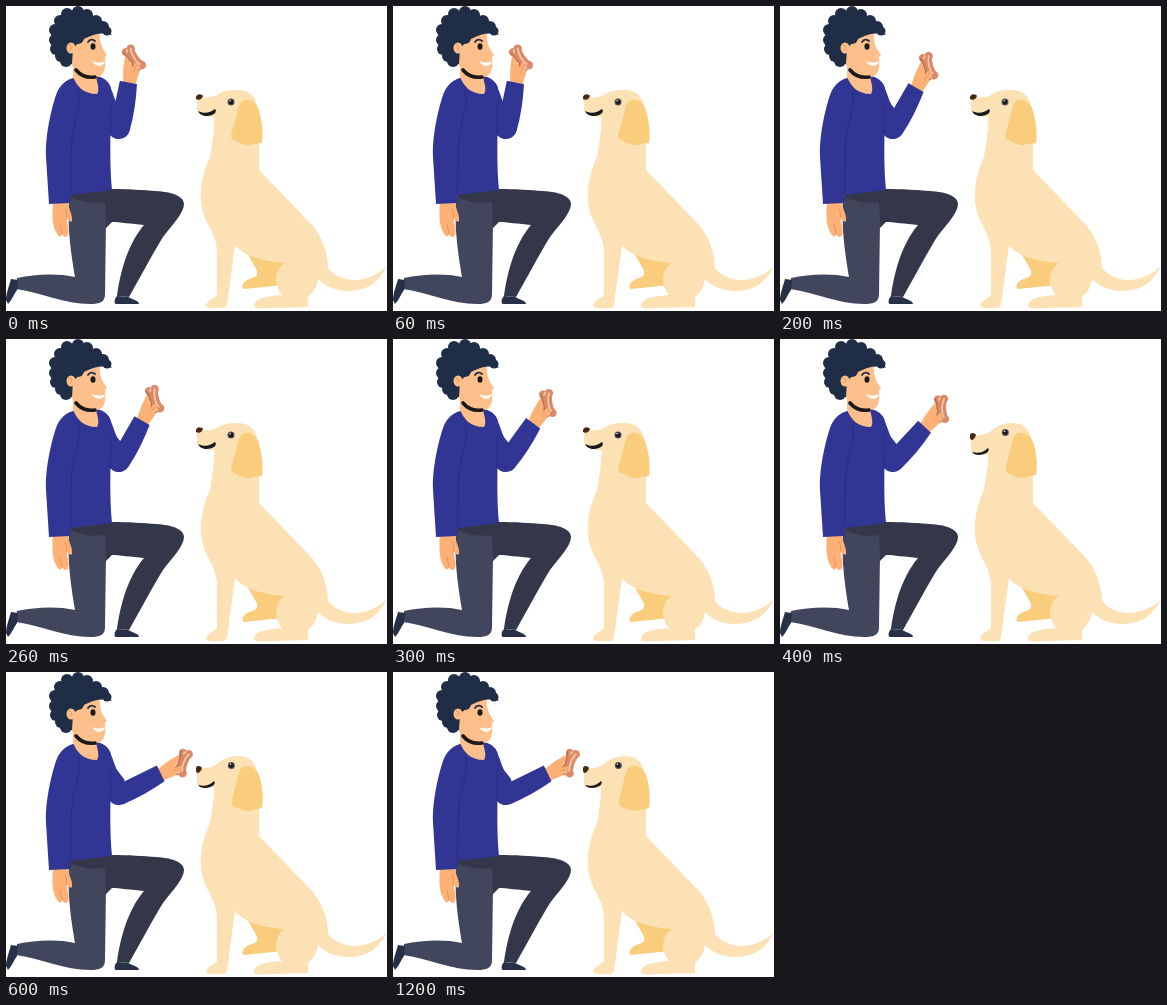
Recreate the animation shown at these times as an HTML page with a canvas. Size 381 by 305 pixels, loop 1.6 s.

```html
<!DOCTYPE html>
<html lang="en">
<head>
<meta charset="utf-8">
<title>Treat for the dog</title>
<style>
html, body { margin: 0; width: 100%; height: 100%; overflow: hidden; background: #fff; }
canvas { display: block; }
</style>
</head>
<body>
<canvas id="stage" width="381" height="305"></canvas>
<script>
const ctx = document.getElementById('stage').getContext('2d');
const LOOP = 1600, STEP = 100;
const ARM_ANGLES = [-78, -68, -60, -54, -47, -38, -26];
const ELBOW = [113, 122];
const HEAD_DROP_STEP = 4;

const C = {
  hair: '#1f2d46', skin: '#fdbf8b', hand: '#fdb176', skinShade: '#e9935f', black: '#1c191b',
  sweater: '#313695', seam: '#292c80',
  farLeg: '#333749', nearLeg: '#42465c', shoe: '#273047',
  fur: '#fbe1b3', ear: '#f9cd7c', nose: '#49260f', eyeRim: '#55565c',
  bone: '#d98a68', boneLight: '#f5c5a8', boneDark: '#b0603f'
};

function fill(color, d) {
  ctx.fillStyle = color;
  ctx.fill(new Path2D(d));
}

function line(color, width, d) {
  ctx.strokeStyle = color;
  ctx.lineWidth = width;
  ctx.lineCap = 'round';
  ctx.stroke(new Path2D(d));
}

function oval(color, x, y, rx, ry = rx) {
  ctx.fillStyle = color;
  ctx.beginPath();
  ctx.ellipse(x, y, rx, ry, 0, 0, Math.PI * 2);
  ctx.fill();
}

function drawLegs() {
  fill(C.farLeg, 'M64 187L106 183C122 183 138 184 150 185C166 186 178 190 178 198C178 207 166 219 157 231C147 247 136 268 123 291L111 290C114 268 121 239 138 219C126 218 113 216 106 216L98 224L66 205Z');
  fill(C.shoe, 'M111 290C108 293 108 298 110 298H133C133 295 128 294 122 291Z');
  fill(C.nearLeg, 'M63 191C75 196 88 198 98 196C101 202 99 209 100 216L99 288C99 296 94 298 84 298C58 298 37 287 10 283L11 272C29 268 52 267 69 271C66 251 61 226 63 191Z');
  fill(C.shoe, 'M12 274L5 273C3 280 0 288 0 294L2 298C6 294 8 288 11 284Z');
}

function drawTorso() {
  fill(C.hand, 'M47 195H62C62 203 67 208 66 215C64 217 62 214 60 211C61 218 64 224 62 229C60 233 57 230 56 228C55 233 52 230 50 226C46 219 46 208 47 195Z');
  line(C.skinShade, 1, 'M59 203C61 206 61 211 60 214M54 218L56 228');
  fill(C.sweater, 'M67 72C57 75 52 82 49 92C42 115 39 138 40 151L43 198L64 197V189L106 184C103 155 105 122 105 82C103 75 97 71 90 70Z');
  line(C.seam, 1, 'M72 85C77 98 68 113 66 133C64 153 66 174 64 195');
  fill(C.skin, 'M67 59V71C71 80 77 88 91 88C94 83 91 77 90 70Z');
}

function drawHead() {
  fill(C.skin, 'M63 33L94 25C93 32 95 39 97 43L101 49L99 51C100 61 99 70 91 71C80 72 71 66 65 58Z');
  line(C.black, 3.6, 'M70 64C75 70 82 72 89 71');
  fill(C.hair, 'M75 3L90 12L102 23L106 29C96 26 88 28 80 32C74 34 70 40 67 42L66 58L55 57L46 43L47 23L58 6Z');
  const curls = [[72, 6], [81, 9], [90, 15], [97, 21], [61, 8], [54, 15], [49, 24],
    [49, 34], [50, 43], [55, 50], [60, 55], [72, 32], [101, 25]];
  curls.forEach(([x, y], i) => oval(C.hair, x, y, i === curls.length - 1 ? 4.5 : 6));
  oval(C.skin, 65, 42, 4.5, 5.5);
  line(C.skinShade, 1, 'M63 39C67 39 66 44 64 44');
  line(C.hair, 1.8, 'M82 36C84 33 87 33 89 35');
  oval(C.black, 87, 40.5, 2.5, 3.2);
  fill('#fff', 'M86 55C91 57 95 57 99 55C98 61 90 62 86 55Z');
}

function drawBone() {
  ctx.save();
  ctx.translate(71, 0);
  ctx.rotate(134 * Math.PI / 180);
  for (const side of [-1, 1]) {
    oval(C.bone, side * 10, -3, 4.2);
    oval(C.bone, side * 9.5, 3, 4.2, 3.8);
  }
  fill(C.bone, 'M-10 -7C-5 -4 5 -4 10 -7V6C5 4 -5 4 -10 6Z');
  line(C.boneDark, .9, 'M-11 6C-5 3.5 5 3.5 11 6');
  line(C.boneLight, 1.8, 'M-10 -3C-4 0 4 0 8 -2M-11 1L-9 2');
  oval(C.boneLight, 10, 1, 1.6);
  ctx.restore();
}

function drawArm(step) {
  fill(C.sweater, 'M96 72C105 76 107 90 111 98L118 107L120 116L113 133C108 133 105 130 102 127Z');
  ctx.save();
  ctx.translate(...ELBOW);
  ctx.rotate(ARM_ANGLES[step] * Math.PI / 180);
  fill(C.hand, 'M43 -5L58 -8L70 -9C73 -8 73 -5 70 -4L65 -2L68 4C67 7 63 8 57 8L43 7Z');
  drawBone();
  fill(C.hand, 'M56 2C60 0 63 1 67 2C70 4 68 6 65 6L57 8Z');
  line(C.skinShade, .7, 'M58 3L66 4');
  oval(C.sweater, 0, 0, 11);
  fill(C.sweater, 'M0 -9L46.5 -9V8.5C30 11 15 12 0 11Z');
  ctx.restore();
  line(C.seam, 1, 'M104 98C105 110 104 121 104 129');
}

function drawDogBody() {
  fill(C.ear, 'M241 247L280 256L277 279L238 283C234 281 238 274 246 272C253 270 252 266 249 261Z');
  fill(C.fur, 'M208 106C210 120 206 137 204 151C196 168 192 188 197 206C201 220 211 230 211 246V289C208 293 201 294 200 300C202 303 210 302 218 302C222 300 221 296 222 291L229 239C235 247 250 255 279 257C270 262 266 277 276 289C262 290 248 292 248 300C249 303 256 303 264 302L302 301V291C308 286 311 280 312 273C326 288 352 288 367 278C373 273 378 266 381 260C367 275 338 281 322 262C322 245 314 228 306 219L253 164V110L230 92Z');
}

function drawDogEye(x, y) {
  oval(C.eyeRim, x, y, 3.5);
  oval(C.black, x, y, 2.4);
  oval('#fff', x - .8, y - 1.2, .8);
}

function drawDogHead(lowered) {
  if (lowered) {
    fill(C.fur, 'M191 98C198 96 206 96 211 92C216 87 224 84 232 84C243 84 249 90 251 99C253 105 253 112 253 118V137H208V115C202 117 193 116 191 112Z');
    fill(C.nose, 'M190 96C191 93 195 94 196 96C195 100 191 103 190 99Z');
    fill(C.black, 'M192 113C199 115 204 113 208 109C211 112 205 116 199 116C196 116 193 115 192 113Z');
    drawDogEye(225.3, 93.5);
    fill(C.ear, 'M238 94C231 98 232 108 228 120C226 127 225 131 227 134C234 137 240 141 247 138L256 136C258 125 256 111 253 103C250 96 244 93 238 94Z');
  } else {
    fill(C.fur, 'M191 92C198 91 206 92 211 89C216 85 223 84 231 84C243 84 249 90 251 99C253 105 253 112 253 118V137H207L209 111C201 111 193 109 191 104Z');
    fill(C.nose, 'M190 91C191 87 196 88 197 90C196 93 193 95 190 93Z');
    fill(C.black, 'M192 105C198 108 204 107 209 103C212 106 207 110 201 110C197 110 193 108 192 105Z');
    drawDogEye(225, 96);
    fill(C.ear, 'M239 94C231 96 232 108 228 119C226 126 224 130 226 133C233 135 239 142 247 138L256 137C258 125 255 110 252 102C249 96 244 93 239 94Z');
  }
}

function draw(now) {
  const step = Math.min(ARM_ANGLES.length - 1, Math.floor(now % LOOP / STEP));
  ctx.fillStyle = '#fff';
  ctx.fillRect(0, 0, 381, 305);
  drawLegs();
  drawTorso();
  drawHead();
  drawArm(step);
  drawDogBody();
  drawDogHead(step >= HEAD_DROP_STEP);
}

let start = null;
function tick(now) {
  start ??= now;
  draw(now - start);
  requestAnimationFrame(tick);
}
draw(0);
requestAnimationFrame(tick);
</script>
</body>
</html>
```
